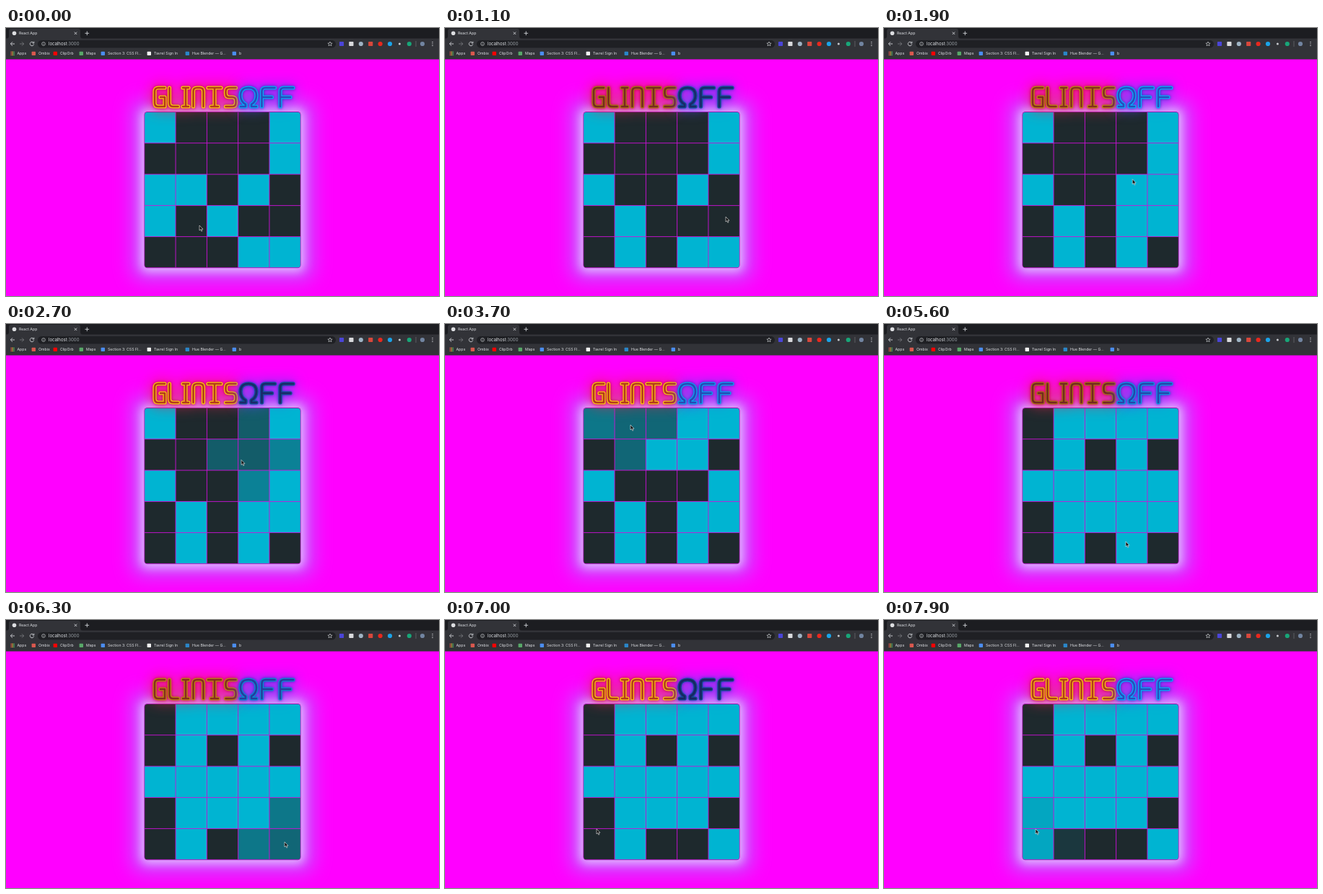
Animation of 600 by 372 pixels, one loop 8 s. Source, as an HTML page:

```html
<!DOCTYPE html>
<html lang="en">
<head>
<meta charset="utf-8">
<title>React App</title>
<style>
  html, body { margin: 0; width: 100%; height: 100%; overflow: hidden; background: #f0f; }
  svg { display: block; width: 600px; height: 372px; }
  text { font: 5.2px Inter, Roboto, sans-serif; fill: #dfe1e5; }
  .line { fill: none; stroke: #d0d2d6; stroke-width: .9; }
  .thin { stroke-width: .65; }
  .halo { fill: #8fa4ff; opacity: .5; filter: blur(13px); }
  .rim { fill: #f0e8ff; opacity: .7; filter: blur(7px); }
  .neon { fill: none; stroke-linecap: round; stroke-linejoin: round; }
  .tube { stroke-width: 5.2; }
  .core { stroke-width: 2.6; }
  #warm { filter: drop-shadow(0 0 2px #c01030) drop-shadow(0 0 10px #f0204a); }
  #cool { filter: drop-shadow(0 0 2px #2038c0) drop-shadow(0 0 9px #5a48f0); }
</style>
</head>
<body>
<svg viewBox="0 0 600 372">
  <defs><clipPath id="round"><rect x="192" y="116.9" width="216" height="215.6" rx="4"/></clipPath></defs>
  <rect width="600" height="372" fill="#f0f"/>

  <g id="browser">
    <rect width="600" height="15" fill="#1c1d21"/>
    <rect y="14.5" width="600" height="29" fill="#323338"/>
    <path d="M0 15Q4 15 4 11V4Q4 1 7 1H100Q103 1 103 4V11Q103 15 107 15Z" fill="#323338"/>
    <rect x="44" y="17" width="413" height="10.5" rx="5.2" fill="#1f2024"/>
    <circle cx="11.5" cy="7.3" r="2.8" fill="#dcdde0"/>
    <path class="line" d="M94.8 5.6l3.4 3.4m0-3.4l-3.4 3.4M109.5 7.3h5.6M112.3 4.5v5.6"/>
    <path class="line" d="M12 22H6.5M9 19.3L6.3 22 9 24.7M38 20.3A2.7 2.7 0 1 0 38.6 22.5M38.8 18.8V21H36.6"/>
    <path class="line" d="M19 22h5.5M22 19.3L24.7 22 22 24.7" opacity=".4"/>
    <circle class="line thin" cx="52" cy="22" r="2.4"/>
    <path class="line thin" d="M52 21.7v1.6M52 20.4v.5"/>
    <path class="line thin" d="M449 19l.9 2 2.2.2-1.7 1.4.6 2.2-2-1.2-2 1.2.6-2.2-1.7-1.4 2.2-.2Z"/>
    <path class="line" d="M568 18v8" opacity=".3"/>
    <path class="line" d="M591 19v1M591 21.5v1M591 24v1" style="stroke-width:1.3"/>
    <text x="18" y="9.2">React App</text>
    <text x="59" y="24.2" style="font-size:6px">localhost<tspan fill="#9aa0a6">:3000</tspan></text>
  </g>

  <rect class="halo" x="174" y="100" width="252" height="250" rx="14"/>
  <rect class="rim" x="187" y="112" width="226" height="226" rx="8"/>
  <rect x="191.4" y="116" width="217.2" height="217.2" rx="4.5" fill="#9c18ae"/>
  <g id="cells" clip-path="url(#round)"><rect x="191" y="116" width="218" height="218" fill="#d010da"/></g>
  <g id="warm" class="neon" role="img" aria-label="GLINTS"></g>
  <g id="cool" class="neon" role="img" aria-label="OFF"></g>
  <path id="cursor" d="M0 0V7L1.6 5.6 2.8 8.2 3.9 7.7 2.8 5.2H5Z" fill="#111" stroke="#fff" stroke-width=".55"/>
</svg>

<script>
const $ = id => document.getElementById(id);
function add(parent, tag, attrs, text = '') {
  const el = document.createElementNS('http://www.w3.org/2000/svg', tag);
  for (const k in attrs) el.setAttribute(k, attrs[k]);
  el.textContent = text;
  return parent.appendChild(el);
}
const mix = (a, b, p) => `rgb(${a.map((v, i) => Math.round(v + (b[i] - v) * p))})`;
const clamp = v => Math.min(1, Math.max(0, v));
const smooth = p => p * p * (3 - 2 * p);
const wave = (t, period) => Math.cos(t / period * 2 * Math.PI);

// Browser buttons and bookmarks
const bar = $('browser');
const icon = (x, y, size, rx, fill) =>
  add(bar, 'rect', {x: x - size / 2, y: y - size / 2, width: size, height: size, rx, fill});
['#4b45d8', '#d9dadd', '#9fb4c4', '#d8483c', '#e8281e', '#1aa3e8', '#c8cacf', '#18a678', '#7184a0']
  .forEach((fill, i) => icon(465 + 13.4 * i + (i > 7 ? 4.8 : 0), 22, i == 6 ? 3 : 6.2, i % 3 < 2 && i < 4 ? .8 : 3.1, fill));
for (let i = 0; i < 9; i++)
  icon(7.2 + i % 3 * 2, 33.4 + (i / 3 | 0) * 2, 1.4, 0, ['#e0554a', '#e8b53a', '#4caf6a'][i % 3]);
[[15.5, 'Apps'], [45, 'Ombix', '#d9584e'], [75, 'ClipOrb', '#f00'], [111, 'Maps', '#58a868'],
 [141, 'Section 3: CSS Fl...', '#4b8df0'], [205, 'Tavrel Sign In', '#f4f4f4'],
 [258, 'Hue Blender — G...', '#2a86c8'], [323, 'b', '#4b8df0']].forEach(([x, label, fill]) => {
  if (fill) icon(x - 6.7, 35.4, 5.4, .8, fill);
  add(bar, 'text', {x, y: 37.3}, label);
});

// Neon title: [width, stroke path] of each letter
const glyphs = {
  G: [14, 'M14 0H5Q0 0 0 5V21Q0 26 5 26H14V13H8'],
  L: [12, 'M0 0V21Q0 26 5 26H12'],
  I: [8, 'M0 0H8M4 0V26M0 26H8'],
  N: [14, 'M0 26V5Q0 0 5 0H9Q14 0 14 5V26'],
  T: [18, 'M0 0H18M9 0V26M4 26H14'],
  S: [14, 'M14 0H5Q0 0 0 5V8Q0 13 5 13H9Q14 13 14 18V21Q14 26 9 26H0'],
  O: [22, 'M0 26H7V23Q0 19 0 11Q0 0 11 0Q22 0 22 11Q22 19 15 23V26H22'],
  F: [18, 'M18 0H5Q0 0 0 5V26M0 13H14']
};
function sign(id, word, left, gap) {
  const layers = ['tube', 'core'].map(name => {
    const g = add($(id), 'g', {class: name});
    let x = left;
    for (const c of word) {
      const [width, d] = glyphs[c];
      add(g, 'path', {d, transform: `translate(${x} 83)`});
      x += width + gap;
    }
    return g;
  });
  return (colors, p) => layers.forEach((g, i) => g.setAttribute('stroke', mix(...colors[i], p)));
}
const paintWarm = sign('warm', 'GLINTS', 206, 6.5);
const paintCool = sign('cool', 'OFF', 325, 7.5);
const warmColors = [[[165, 110, 20], [250, 196, 20]], [[115, 40, 30], [180, 58, 25]]];
const coolColors = [[[16, 70, 135], [10, 172, 250]], [[24, 36, 96], [40, 76, 190]]];

// Stops of the pointer: time, x, y; it clicks at each one except where it only hovers
const stops = [
  [300, 268, 274], [1350, 389, 262], [2620, 326, 188.5], [3600, 257, 140],
  [5000, 290, 238], [5550, 335, 302, 'hover'], [6200, 386, 308], [7630, 210, 290]
];
function pointer(t) {
  const i = Math.max(1, stops.findLastIndex(s => s[0] + 100 <= t) + 1);
  const [from, x, y] = stops[i - 1], [to, nx, ny] = stops[i] || stops[i - 1];
  const p = smooth(clamp((t - from - 100) / Math.min(700, to - from - 100 || 1)));
  return [x + (nx - x) * p, y + (ny - y) * p];
}

// Board: a click flips its cell and the four neighbours
const left = 191.75, top0 = 116.45, pitch = 43.3, gap = .9;
const dark = [30, 41, 45], lit = [0, 180, 210];
const start = ['10001', '00001', '11010', '10100', '00011'];
const clicks = stops.filter(s => !s[3])
  .map(([at, x, y]) => [at, Math.floor((y - top0) / pitch), Math.floor((x - left) / pitch)]);
const cells = [];
for (let r = 0; r < 5; r++)
  for (let c = 0; c < 5; c++)
    cells.push({r, c, el: add($('cells'), 'rect', {
      x: left + c * pitch + gap / 2, y: top0 + r * pitch + gap / 2,
      width: pitch - gap, height: pitch - gap})});

function light({r, c}, t) {
  let on = +start[r][c], level = on;
  for (const [at, row, col] of clicks) {
    if (t < at || Math.abs(r - row) + Math.abs(c - col) > 1) continue;
    on = 1 - on;
    level += (on - level) * (1 - (1 - clamp((t - at) / 400)) ** 2);
  }
  return level;
}

function draw(t) {
  for (const cell of cells) cell.el.setAttribute('fill', mix(dark, lit, light(cell, t)));
  paintWarm(warmColors, Math.min(1, 1 - wave(t - 1350, 4400)));
  paintCool(coolColors, .5 + .5 * wave(t + 100, 2000));
  $('cursor').setAttribute('transform', `translate(${pointer(t)})`);
}
const begin = performance.now();
function tick() {
  draw((performance.now() - begin) % 8000);
  requestAnimationFrame(tick);
}
tick();
</script>
</body>
</html>
```
